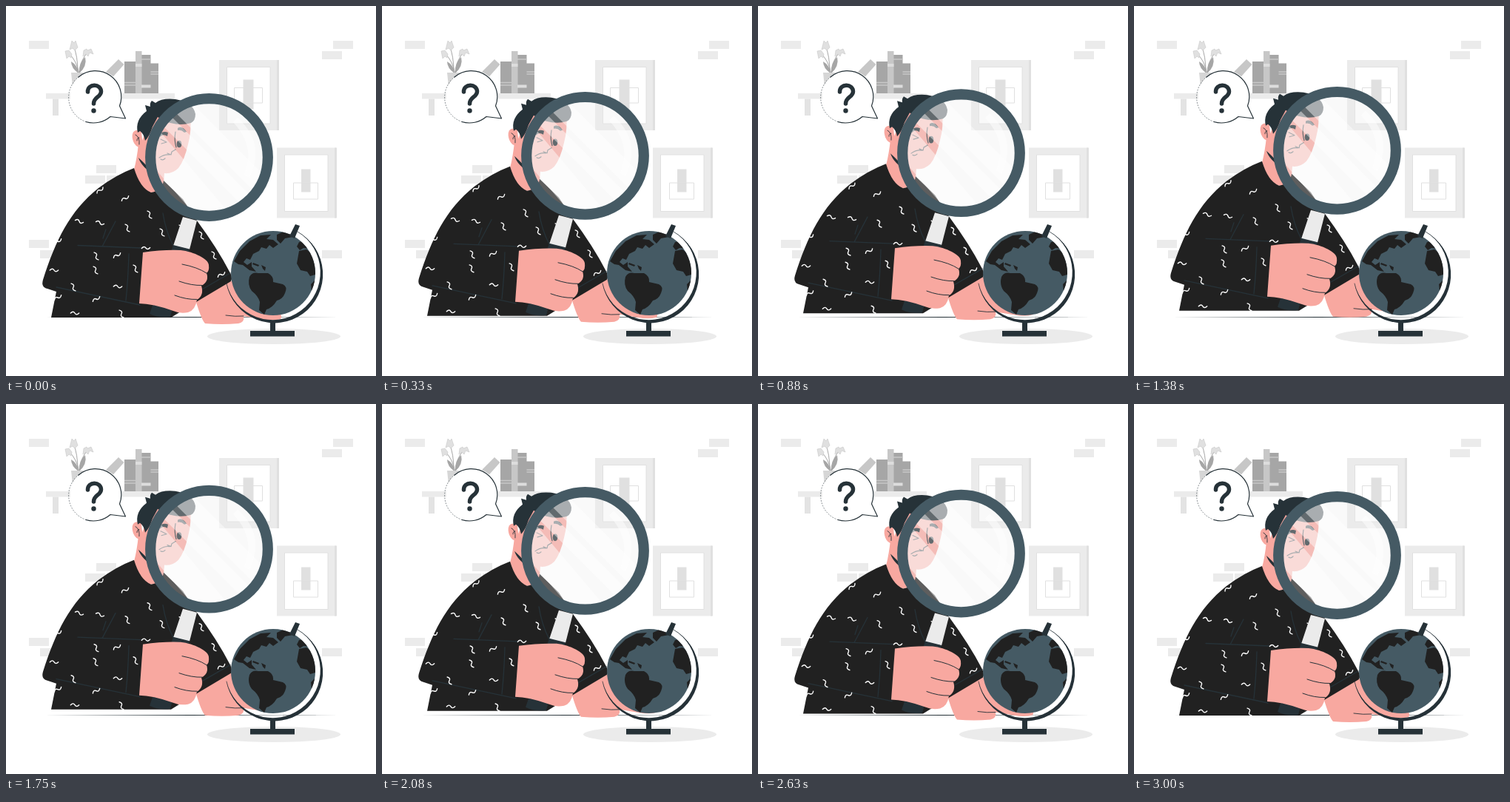
An HTML page for the animation above (3040 ms loop, 500 by 500 pixels).

```html
<!DOCTYPE html>
<html lang="en">
<head>
<meta charset="utf-8">
<title>Looking closely at a globe</title>
<style>
html, body { margin: 0; width: 100%; height: 100%; overflow: hidden; background: #fff; }
svg { display: block; width: 100vw; height: 100vh; }
.ink { fill: #263238; }
.line { fill: none; stroke: #263238; stroke-linecap: round; stroke-linejoin: round; }
.skin { fill: #f8a8a0; }
.cloth { fill: #212121; }
.slate { fill: #455a64; }
.pale { fill: #ebebeb; }
</style>
</head>
<body>
<svg viewBox="0 0 500 500">
  <defs>
    <path id="squiggle" d="M-5.5 1.5C-3.5-2-1.5-1.5 0 0S3.500 2 5.500-1.500" fill="none" stroke="#fff" stroke-width="1.4" stroke-linecap="round"/>
    <clipPath id="glass"><circle cx="274.5" cy="204.500" r="73"/></clipPath>
    <clipPath id="ball"><circle cx="361" cy="361" r="57"/></clipPath>
    <g id="picture">
      <path class="pale" d="M0 0H80V95H0Z"/>
      <path fill="#e0e0e0" d="M78 0h3v95h-3z"/>
      <path fill="#fff" stroke="#e0e0e0" d="M10.500 9.500H69V86H10.500Z"/>
    </g>
  </defs>

  <!-- wall -->
  <g id="bricks" class="pale"></g>
  <use href="#picture" x="288" y="73"/>
  <path fill="#e0e0e0" d="M320.500 99.500h14v40h-14z"/>
  <path fill="none" stroke="#e0e0e0" d="M308.500 110.500h38v20.500h-38z"/>
  <use href="#picture" x="366" y="191.500"/>
  <path fill="#e0e0e0" d="M399 220.500h12.500v31H399z"/>
  <path fill="none" stroke="#e0e0e0" d="M388.500 239h33v22h-33z"/>

  <!-- shelf, plant and books -->
  <path class="pale" d="M54 118H228V125.500H54Z"/>
  <path fill="#e3e3e3" d="M63 125.500h8V148h-8z"/>
  <path fill="none" stroke="#a6a6a6" d="M97 91Q97 66 91 54M99 91Q95 74 86 65M99 91Q101 73 109 64"/>
  <path fill="#a6a6a6" d="M98 91Q88 84 88 75Q97 80 98 91ZM99 91Q98 76 107 69Q110 81 99 91Z"/>
  <path fill="#e0e0e0" stroke="#c7c7c7" stroke-width=".6" d="M89 47l3 3 2-3 3 9-4 4-3-3-4 2ZM80 61l5-1 4 5-1 5-3-2-3 3ZM105 60l4-2 1 2 5-2 3 7-5-2-2 5-3-3-4 3Z"/>
  <path fill="#d6d6d6" d="M88 90h22l-3 28H91Z"/>
  <path fill="#c7c7c7" d="M132 92 152 72 159.500 79 139 102Z"/>
  <path fill="#a6a6a6" d="M160 75h15v43h-15zM183 66h12.500v52H183zM195.500 77.500H206V118h-10.500z"/>
  <path fill="#c7c7c7" d="M175 61h8.500v57H175z"/>
  <path stroke="#c7c7c7" stroke-width="1.3" d="M160 103.500h15M160 107h15M183 72h12.500M195.500 89H206M195.500 92H206"/>
  <path stroke="#ddd" stroke-width="4" d="M175 80h8.500M183 108.500h12.500"/>

  <path class="ink" d="M52 420.400 250 419.900 449 420.400 250 420.900Z"/>
  <ellipse class="pale" cx="362" cy="446.500" rx="90" ry="10.500"/>

  <g id="person">
    <!-- resting hand -->
    <path class="skin" d="M256 397 298 371 308 372Q315 392 326 405L370 416Q374 419 371 423Q360 426 345 423L321 419Q323 427 314 429Q292 431 269 429Q264 424 256 397Z"/>
    <path class="line" d="M297 418Q310 420 321 419" stroke-width=".9"/>

    <!-- neck, ear, face -->
    <path class="skin" d="M179 186Q177 206 173 221Q182 250 196 252Q208 251 213 239L215 212Z"/>
    <path class="skin" d="M183 170C173 164 168 172 172 183Q176 193 185 190Z"/>
    <path class="line" d="M175 174Q181 177 180 187M180 178Q177 178 177 182" stroke-width=".9"/>
    <path class="skin" d="M198 145 182 187Q186 207 203 223Q221 231 233 219Q241 209 246 187Q251 168 249 150Z"/>
    <path class="ink" d="M179 205Q183 218 202 229Q189 214 179 205Z"/>

    <!-- hair -->
    <path class="ink" d="M178 171Q174 154 190 142L188 134 195 136Q194 131 197 128L202 131Q211 124 229 126Q253 130 256 146Q256 155 250 158Q237 162 222 158Q212 155 205 150L198 163Q194 176 188 182Q186 172 181 169Z"/>

    <!-- features -->
    <path class="ink" d="M207 174Q212 168 219 171L218 176Q212 172 208 177ZM232 165Q238 161 244 170L241 171Q237 167 232 168Z"/>
    <path class="line" d="M209 180 217 184 210 186" stroke-width="1.100"/>
    <ellipse class="ink" cx="234" cy="186.500" rx="3.300" ry="4.800"/>
    <path class="line" d="M229 170Q227 181 230 191M229 194 224 197 223 201 218 199M207 205Q214 200 221 201M209 207Q212 209 215 206" stroke-width="1.200"/>

    <!-- shirt -->
    <path class="cloth" d="M173 219Q149 228 125 246C86 277 67 317 50 370Q47 380 56 382L68 386 61 421H223L257 400 304 372Q307 367 302 359Q286 328 258 290L239 261 213 236Q211 250 196 252Q181 246 173 219Z"/>
    <path class="line" d="M97 323.500 183 327M166 335Q165 370 162 398M68 380 181 404M148 291 130 325M135 302 131 314M303 361 263 384M212 280Q216 305 226 324" stroke-width="1.300"/>
    <g id="pattern"></g>

    <!-- magnifier -->
    <g clip-path="url(#glass)">
      <circle cx="274.500" cy="204.500" r="73" fill="#ebebeb" opacity=".3"/>
      <path fill="#fff" opacity=".45" d="M190 148 310 290H262L180 195ZM211 137 340 266 330 280 197 147ZM250 130 345 225 335 250 225 140Z"/>
      <path fill="#fff" opacity=".5" d="M313 151Q351 185 329 232L322 228Q338 190 307 157Z"/>
    </g>
    <path class="pale" d="M239 285 258 290 248 329 226 324Z"/>
    <path class="ink" d="M226 323 248 328.500 222 420Q206 422 194 416Z"/>
    <circle cx="274.500" cy="204.500" r="79.300" fill="none" stroke="#455a64" stroke-width="14.200"/>

    <!-- holding hand -->
    <path class="skin" d="M185 333Q213 329 236 330C254 332 274 342 274 350Q275 358 271 361Q275 372 264 378Q268 391 258 397Q256 411 246 414Q235 416 226 412Q198 402 180 402Z"/>
    <path class="line" d="M238 349Q259 353 271 361M234 372Q251 378 265 377.500M228 391Q244 397 258 396.500" stroke-width="1"/>
  </g>

  <!-- globe -->
  <circle class="slate" cx="361" cy="361" r="57"/>
  <g class="cloth" clip-path="url(#ball)">
    <path d="M329 366Q333 359 341 361L354 361Q362 365 361 373L374 376Q381 379 377 388Q374 396 366 398Q360 408 352 410L349 417 342 411 343 400Q341 392 332 385Q326 377 329 366Z"/>
    <path d="M308 345 316 331 329 318 344 310 358 309 352 315 361 316 368 322 361 327 356 323 352 328 345 326 342 331 334 335 330 343 325 341 321 346 326 350 332 346 332 352 338 359 329 357 320 350 314 349Z"/>
    <path d="M366 309 377 304 393 306 388 312 377 314 371 321 366 316ZM334 347l8 3-1 2-8-3ZM345 350l6 3-1 5-3-3Z"/>
    <path d="M396 331 406 329 413 334 420 348 418 363 411 365 407 359 398 357 393 348ZM396 319 405 317 411 328 402 327 397 330 393 325ZM412 376l8-8v12l-7 6Z"/>
  </g>
  <path class="ink" d="M394 305A65.700 65.700 0 1 1 298 375A64.300 64.300 0 1 0 394 305Z"/>
  <path class="line" d="M394 305A65.200 65.200 0 1 1 298 375" stroke-width=".7"/>
  <path class="ink" d="M391 295 397 297 390 314 383 311ZM357 426h7v13h26v7.500H330V439H357Z"/>

  <!-- question bubble -->
  <path fill="#fff" d="M154 135 161.500 152 142 150A35 35 0 1 1 154 135Z"/>
  <path class="line" d="M98 96A35 35 0 0 1 153.500 135L161.500 152 141 149.500A35 35 0 0 1 108 156.500" stroke-width="1.200"/>
  <path class="line" d="M98 96A35 35 0 0 0 108 156.500" stroke-width=".6" stroke-dasharray="1 2.500"/>
  <path class="line" d="M110.500 116C110 104.500 128.500 104.500 128.500 115.500C128.500 123.500 118.500 122.500 118.500 132" stroke-width="5.500"/>
  <circle class="ink" cx="118.500" cy="141.500" r="3.200"/>
</svg>
<script>
const $ = id => document.getElementById(id);

$('bricks').innerHTML = [
  [31, 47], [442, 47], [427, 61], [122, 215], [107, 229], [136, 229], [31, 316], [46, 330], [427, 330]
].map(([x, y]) => `<rect x="${x}" y="${y}" width="27" height="11"/>`).join('');

// x, y, angle
$('pattern').innerHTML = [
  [127, 249, -30], [161, 260, -20], [99, 291, 30], [127, 293, 30], [164, 300, 75], [194, 282, 75],
  [211, 306, 75], [70, 318, -20], [189, 327, 10], [122, 338, 75], [150, 337, -20], [175, 355, 75],
  [65, 357, 15], [121, 357, 75], [91, 380, 75], [151, 379, 15], [70, 394, -20], [122, 396, -20],
  [93, 415, 15], [156, 416, 75], [264, 310, 75], [281, 337, 75], [291, 363, -20], [237, 301, 75]
].map(([x, y, a]) => `<use href="#squiggle" transform="translate(${x} ${y}) rotate(${a})"/>`).join('');

// Steady rise and fall of 10px, then a short rest.
const LOOP = 3040, HALF = 1500, RISE = 10;
function draw(now) {
  const t = now % LOOP;
  const lift = RISE * Math.max(0, 1 - Math.abs(t - HALF) / HALF);
  $('person').setAttribute('transform', `translate(0 ${-lift})`);
  requestAnimationFrame(draw);
}
draw(performance.now());
</script>
</body>
</html>
```
